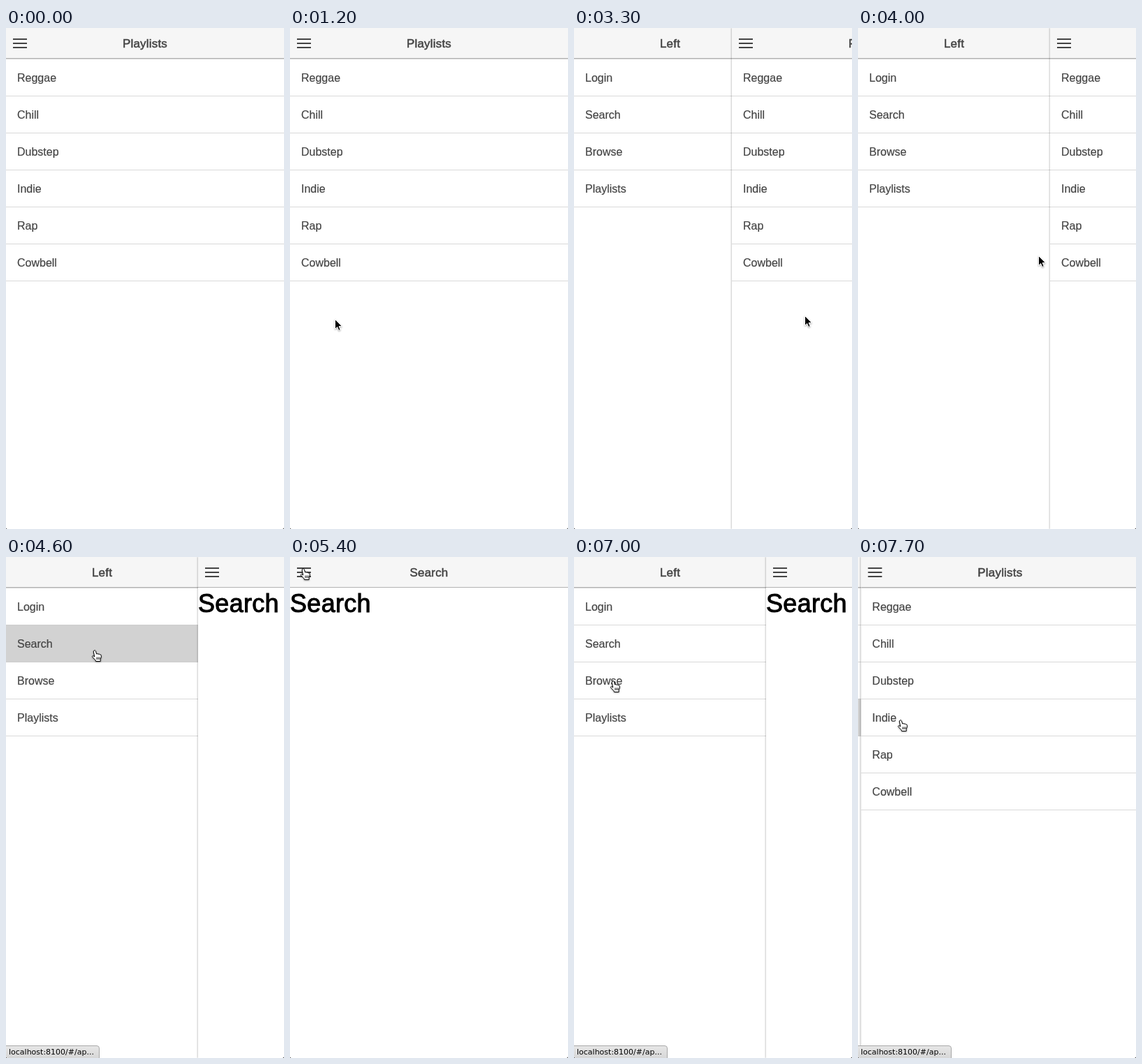
An HTML page that plays this animation: 398 by 718 pixels, repeating every 7800 ms.

```html
<!DOCTYPE html>
<html lang="en">
<head>
<meta charset="utf-8">
<title>Side menu</title>
<style>
html, body { margin: 0; width: 100%; height: 100%; overflow: hidden; background: #222; }
#stage {
  position: relative; width: 398px; height: 718px; overflow: hidden;
  background: #fff; border-radius: 0 0 3px 3px;
  font: 16px/20px "Liberation Sans", Arial, sans-serif; color: #444;
  -webkit-text-stroke: .2px;
}
#menu, #panel { position: absolute; top: 0; left: 0; height: 718px; background: #fff; }
#menu { width: 275px; }
#panel { width: 398px; box-shadow: -1px 0 2px rgba(0,0,0,.2), 1px 0 2px rgba(0,0,0,.2); }
header {
  position: relative; box-sizing: border-box; height: 44px;
  background: #f6f6f6; border-bottom: 1px solid #b2b2b2;
  font-size: 17px; line-height: 46px; text-align: center;
  letter-spacing: .2px; -webkit-text-stroke: .5px;
}
.icon { position: absolute; left: 10px; top: 15px; }
.icon, .icon::before, .icon::after { width: 20px; height: 2px; background: #444; }
.icon::before, .icon::after { content: ""; position: absolute; left: 0; }
.icon::before { top: 6px; }
.icon::after { top: 12px; }
.row {
  box-sizing: border-box; height: 54px; margin-bottom: -1px; padding: 17px 16px 15px;
  border: solid #d9d9d9; border-width: 1px 0;
}
.row.active { background: #d2d2d2; border-color: #ccc; position: relative; }
h1 {
  margin: 0; font-size: 36px; font-weight: 400; line-height: 46px;
  letter-spacing: .3px; color: #000; -webkit-text-stroke: 1px;
}
#status {
  position: absolute; left: -1px; top: 700px; width: 133px; height: 18px;
  border: 1px solid #a8a8a8; border-radius: 0 4px 0 0;
  background: linear-gradient(#e6e6e6, #d6d6d6); color: #000;
  font: 11px/17px "DejaVu Sans", sans-serif; text-indent: 4px; white-space: nowrap;
  -webkit-text-stroke: 0;
}
#cursor {
  position: absolute; left: 0; top: 0; overflow: visible;
  filter: drop-shadow(0 1px 1px rgba(0,0,0,.35));
}
</style>
</head>
<body>
<div id="stage">
  <div id="menu"><header>Left</header></div>
  <div id="panel">
    <header><i class="icon"></i><span id="title"></span></header>
    <div id="playlists"></div>
    <h1 id="search">Search</h1>
  </div>
  <div id="status">localhost:8100/#/ap...</div>
  <svg id="cursor" width="18" height="20">
    <path id="arrow" fill="#000" stroke="#fff" stroke-linejoin="round"
      d="M.5 .5V14.5L3.7 11.5L5.8 16.5L8.2 15.5L6.1 10.6H10.5Z"/>
    <g id="hand" transform="translate(-6 -1)" stroke="#000" stroke-linejoin="round">
      <path fill="#fff" d="M4 1.2Q5.6 0 6.4 1.7L7.6 6Q9 5 10 6.2Q11.4 5.5 12.2 6.8Q14.2 6.5 14.4 8.5Q14.6 11 13.2 13.5V16.5H6.6L6 14.8L2 10.6Q.8 9 2.4 8.5L4.8 10L3.3 3Q3 1.7 4 1.2Z"/>
      <path fill="none" stroke-width=".9" d="M8 10.5V14M10 10.5V14M12 10.5V14"/>
    </g>
  </svg>
</div>
<script>
const LOOP = 7800, STEP = 100, HEADER = 44, ROW = 53;
const MENU = 275, GRIP = 104, SLIDE = 267;
const ENTER = 400, GRAB = 2900, RELEASE = 3300;
const PICK_SEARCH = 4600, REOPEN = 6100, PICK_PLAYLISTS = 7500;
const $ = id => document.getElementById(id);

const menuItems = ["Login", "Search", "Browse", "Playlists"];
const playlists = ["Reggae", "Chill", "Dubstep", "Indie", "Rap", "Cowbell"];

const entry = { x: 384, y: 698 };
const moves = [
  { from: ENTER, to: 800, x: 212, y: 420 },
  { from: 900, to: 1300, x: 37, y: 417 },
  { from: 1800, to: 2200, x: 360, y: 410 },
  { from: 2200, to: 2500, x: 109, y: 406 },
  { from: 2500, to: 2800, x: 74, y: 414 },
  { from: GRAB, to: RELEASE, x: 330, y: 412 },
  { from: RELEASE, to: 3700, x: 318, y: 415 },
  { from: 3700, to: 4500, x: 128, y: 134 },
  { from: PICK_SEARCH, to: 5400, x: 20, y: 17 },
  { from: 6400, to: 7000, x: 57, y: 178 },
  { from: 7000, to: 7300, x: 62, y: 234 }
];

const clamp = (v, lo, hi) => Math.min(hi, Math.max(lo, v));
const progress = (t, from, to) => clamp((t - from) / (to - from), 0, 1);
const easeInOut = k => k * k * (3 - 2 * k);
const easeOut = k => 1 - (1 - k) ** 3;
const within = (t, from, to) => t >= from && t < to;
const show = (el, on) => { el.style.display = on ? "" : "none"; };

function addRows(parent, names) {
  return names.map(name => {
    const row = document.createElement("div");
    row.className = "row";
    row.textContent = name;
    return parent.appendChild(row);
  });
}
const menuRows = addRows($("menu"), menuItems);
addRows($("playlists"), playlists);

function cursorAt(t) {
  let { x, y } = entry;
  for (const move of moves) {
    const k = easeInOut(progress(t, move.from, move.to));
    x += (move.x - x) * k;
    y += (move.y - y) * k;
  }
  return { x: Math.round(x), y: Math.round(y) };
}

// The panel follows the drag, then slides open or shut after each tap.
function panelAt(t, cursorX) {
  if (t < GRAB) return 0;
  const dragged = clamp(cursorX - GRIP, 0, MENU);
  if (t < RELEASE) return dragged;
  const slide = start => easeOut(progress(t, start, start + SLIDE));
  if (t >= PICK_PLAYLISTS) return MENU * (1 - slide(PICK_PLAYLISTS));
  if (t >= REOPEN) return MENU * slide(REOPEN);
  if (t >= PICK_SEARCH) return MENU * (1 - slide(PICK_SEARCH));
  const released = cursorAt(RELEASE).x - GRIP;
  return released + (MENU - released) * slide(RELEASE);
}

function isPointing({ x, y }, panelX, searching) {
  const overMenu = x < panelX;
  if (y < HEADER) return !overMenu && x - panelX < HEADER;
  const rowCount = overMenu ? menuItems.length : searching ? 0 : playlists.length;
  return y < HEADER + ROW * rowCount;
}

function render(t) {
  const cursor = cursorAt(t);
  const panelX = panelAt(t, cursor.x);
  const searching = within(t, PICK_SEARCH, PICK_PLAYLISTS);
  const pointing = isPointing(cursor, panelX, searching);

  $("panel").style.transform = `translateX(${panelX}px)`;
  $("title").textContent = searching ? "Search" : "Playlists";
  show($("playlists"), !searching);
  show($("search"), searching);
  menuRows[1].classList.toggle("active", within(t, PICK_SEARCH - STEP, REOPEN));
  menuRows[3].classList.toggle("active", t >= PICK_PLAYLISTS - STEP);
  show($("status"), within(t, 4200, 5400) || t >= 6600);

  show($("cursor"), t >= ENTER);
  show($("hand"), pointing);
  show($("arrow"), !pointing);
  $("cursor").style.transform = `translate(${cursor.x}px, ${cursor.y}px)`;
}

const start = performance.now();
function tick() {
  const t = (performance.now() - start) % LOOP;
  render(Math.floor(t / STEP) * STEP);
  requestAnimationFrame(tick);
}
tick();
</script>
</body>
</html>
```
